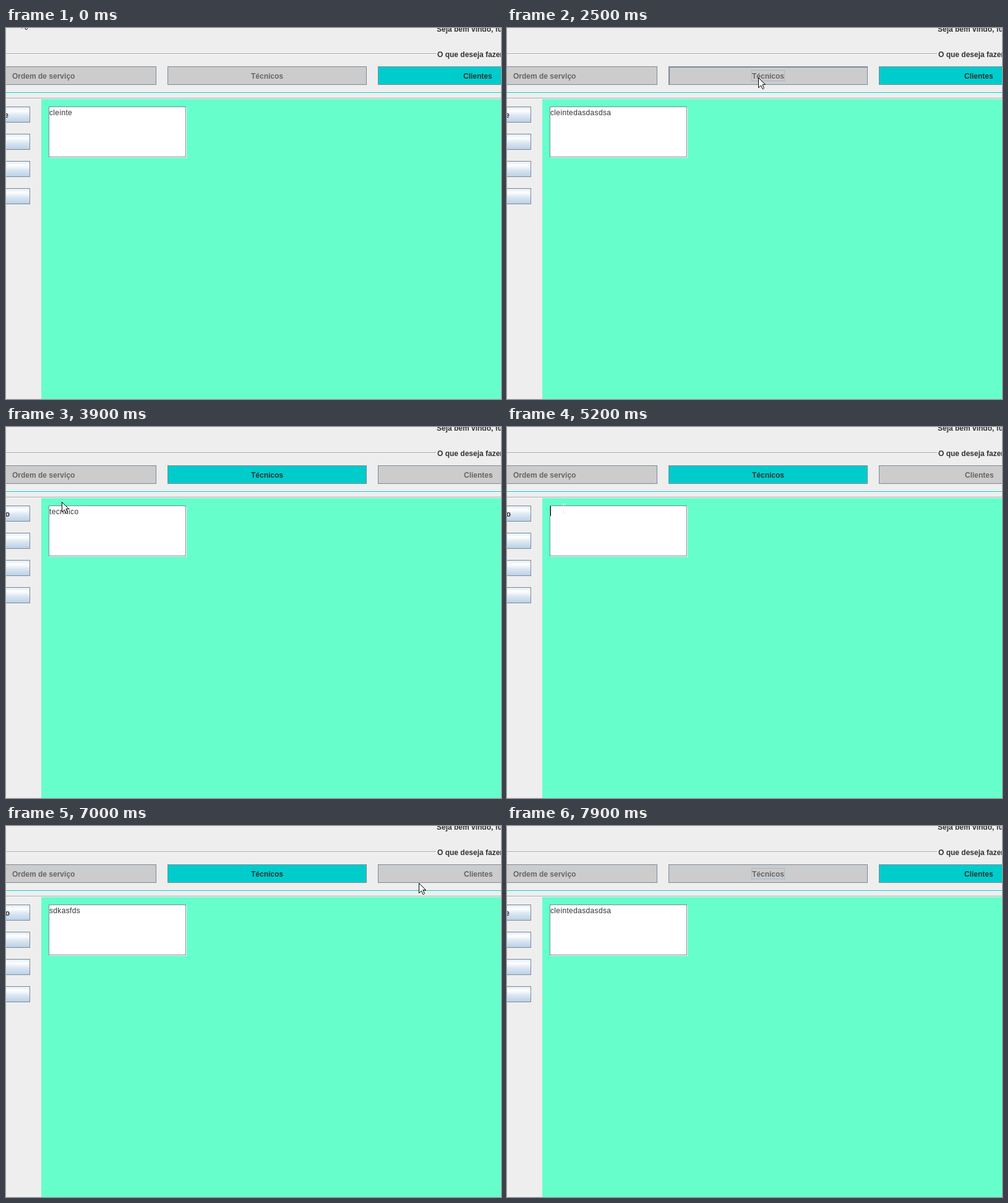
Recreate the animation shown at these times as an HTML page with a canvas. Size 800 by 600 pixels, loop 8000 ms.

```html
<!DOCTYPE html>
<html lang="pt">
<head>
<meta charset="utf-8">
<style>
  html, body { margin: 0; width: 800px; height: 600px; overflow: hidden; }
  canvas { display: block; }
</style>
</head>
<body>
<canvas id="stage" width="800" height="600"></canvas>
<script>
const ctx = document.getElementById('stage').getContext('2d', { alpha: false });
const LOOP = 8000, STEP = 100;
const BORDER = '#7a8a99', CYAN = '#00cccc', INK = '#333333', FACE = '#eeeeee';

// Stops of the pointer: time, x, y; it eases from one to the next
const stops = [
  [100, 25, -16], [200, 25, 4], [300, 25, -20], [800, 155, -40], [900, 155, 146],
  [2000, 155, 146], [2400, 406, 80], [3200, 406, 80], [3500, 30, 142], [3700, 36, 142],
  [3900, 90, 121], [4200, 120, 136], [4500, 120, 136], [4900, 61, 136], [5200, 91, 131],
  [5500, 156, 132], [6500, 156, 132], [7000, 667, 92], [7100, 667, 92], [7400, 745, 76],
  [7900, 810, 80],
];

const between = (t, from, to) => t >= from && t < to;

function pointerAt(t) {
  const i = stops.findIndex(stop => stop[0] > t);
  if (i < 1) return stops.at(i).slice(1);
  const [t0, x0, y0] = stops[i - 1], [t1, x1, y1] = stops[i];
  const p = (t - t0) / (t1 - t0), k = p * p * (3 - 2 * p);
  return [Math.round(x0 + (x1 - x0) * k), Math.round(y0 + (y1 - y0) * k)];
}

function rect(color, x, y, w, h) {
  ctx.fillStyle = color;
  ctx.fillRect(x, y, w, h);
}

function frame(color, x, y, w, h) {
  ctx.strokeStyle = color;
  ctx.lineWidth = 1;
  ctx.strokeRect(x + .5, y + .5, w - 1, h - 1);
}

function rule(color, y, w) {
  rect(color, 0, y, w, 1);
  rect('#ffffff', 0, y + 1, w, 1);
}

function setFont(weight) {
  ctx.font = `${weight} 12px "Liberation Sans", Arial, sans-serif`;
  ctx.letterSpacing = weight === 'bold' ? '0px' : '0.35px';
}

function label(text, x, y, color = INK, weight = 'bold') {
  setFont(weight);
  ctx.fillStyle = color;
  ctx.fillText(text, x, y);
  return ctx.measureText(text).width;
}

function tab(text, x, w, textX, { active, focus, pressed }) {
  rect(active ? CYAN : '#cccccc', x, 62, w, 30);
  frame(BORDER, x, 62, w, 30);
  if (pressed) {
    rect(BORDER, x, 62, w, 2);
    rect(BORDER, x, 62, 2, 30);
  }
  const width = label(text, textX, 82, active ? INK : '#666666');
  if (focus) frame('#a3b8cc', textX - 1, 68, Math.round(width) + 2, 18);
}

function sideButton(y) {
  const fill = ctx.createLinearGradient(0, y, 0, y + 26);
  fill.addColorStop(0, '#dde8f3');
  fill.addColorStop(7 / 26, '#ffffff');
  fill.addColorStop(14 / 26, '#dde8f3');
  fill.addColorStop(1, '#b8cfe5');
  rect(fill, -20, y, 59, 26);
  frame(BORDER, -20, y, 59, 26);
}

function textArea(text, caret, selectFrom) {
  rect('#ffffff', 70, 128, 222, 82);
  frame(BORDER, 69, 127, 222, 82);
  setFont('normal');
  const end = 70 + Math.round(ctx.measureText(text).width);
  const caretX = Math.min(end, selectFrom);
  rect('#b8cfe5', caretX, 128, end - caretX, 16);
  label(text, 70, 141, INK, 'normal');
  if (caret) rect('#000000', caretX, 128, 1, 16);
}

function arrow(x, y) {
  ctx.save();
  ctx.translate(x + .5, y + .5);
  const shape = new Path2D('M0 0V16L4 12.5L6.5 18H8L9 17L6.5 11H11Z');
  ctx.fillStyle = '#ffffff';
  ctx.fill(shape);
  ctx.strokeStyle = '#000000';
  ctx.lineWidth = 1;
  ctx.stroke(shape);
  ctx.restore();
}

function beam(x, y) {
  rect('#f0f0f0', x, y - 6, 1, 14);
  for (const end of [y - 7, y + 8]) {
    rect('#f0f0f0', x - 3, end, 3, 1);
    rect('#f0f0f0', x + 1, end, 3, 1);
  }
}

// Letters appear over seven steps
function typed(text, start, t) {
  const steps = Math.min(7, Math.max(0, (t - start) / STEP + 1));
  return text.slice(0, Math.round(steps * text.length / 7));
}

function content(t, technicians) {
  if (!technicians) return 'cleinte' + typed('dasdasdsa', 1300, t);
  return t < 5000 ? 'tecnnico' : typed('sdkasfds', 5700, t);
}

function draw(t) {
  const technicians = between(t, 2600, 7600);
  const [x, y] = pointerAt(t);

  rect(FACE, 0, 0, 800, 600);
  label('Seja bem vindo, fulano', 696, 6);
  rule('#a6a6a6', 41, 695);
  label('O que deseja fazer?', 697, 47);

  tab('Ordem de serviço', -140, 383, 10, {});
  tab('Técnicos', 261, 322, 396, {
    active: technicians,
    focus: between(t, 800, 900) || between(t, 2500, 2600) || t >= 7700,
    pressed: between(t, 2500, 2900),
  });
  tab('Clientes', 601, 322, technicians ? 740 : 739, {
    active: !technicians,
    focus: between(t, 2600, 3400) || between(t, 7500, 7600),
    pressed: between(t, 7500, 7700),
  });

  rule(CYAN, 104, 800);
  rule('#a6a6a6', 113, 800);
  for (let i = 0; i < 4; i++) sideButton(127 + 44 * i);
  ctx.textAlign = 'right';
  label(technicians ? 'Técnico' : 'Cliente', technicians ? 6 : 4, 145);
  ctx.textAlign = 'left';

  rect('#66ffcc', 57, 115, 743, 485);
  const caret = between(t, 900, 2500) || between(t, 4500, 6800);
  const selectFrom = between(t, 4700, 5000) ? Math.max(70, x) : Infinity;
  textArea(content(t, technicians), caret, selectFrom);

  const overText = between(x, 61, 292) && y >= 127 && !between(t, 3500, 3900);
  if (overText) beam(x, y);
  else arrow(x, y);
}

function tick(now) {
  draw(Math.floor(now % LOOP / STEP) * STEP);
  requestAnimationFrame(tick);
}
requestAnimationFrame(tick);
</script>
</body>
</html>
```
